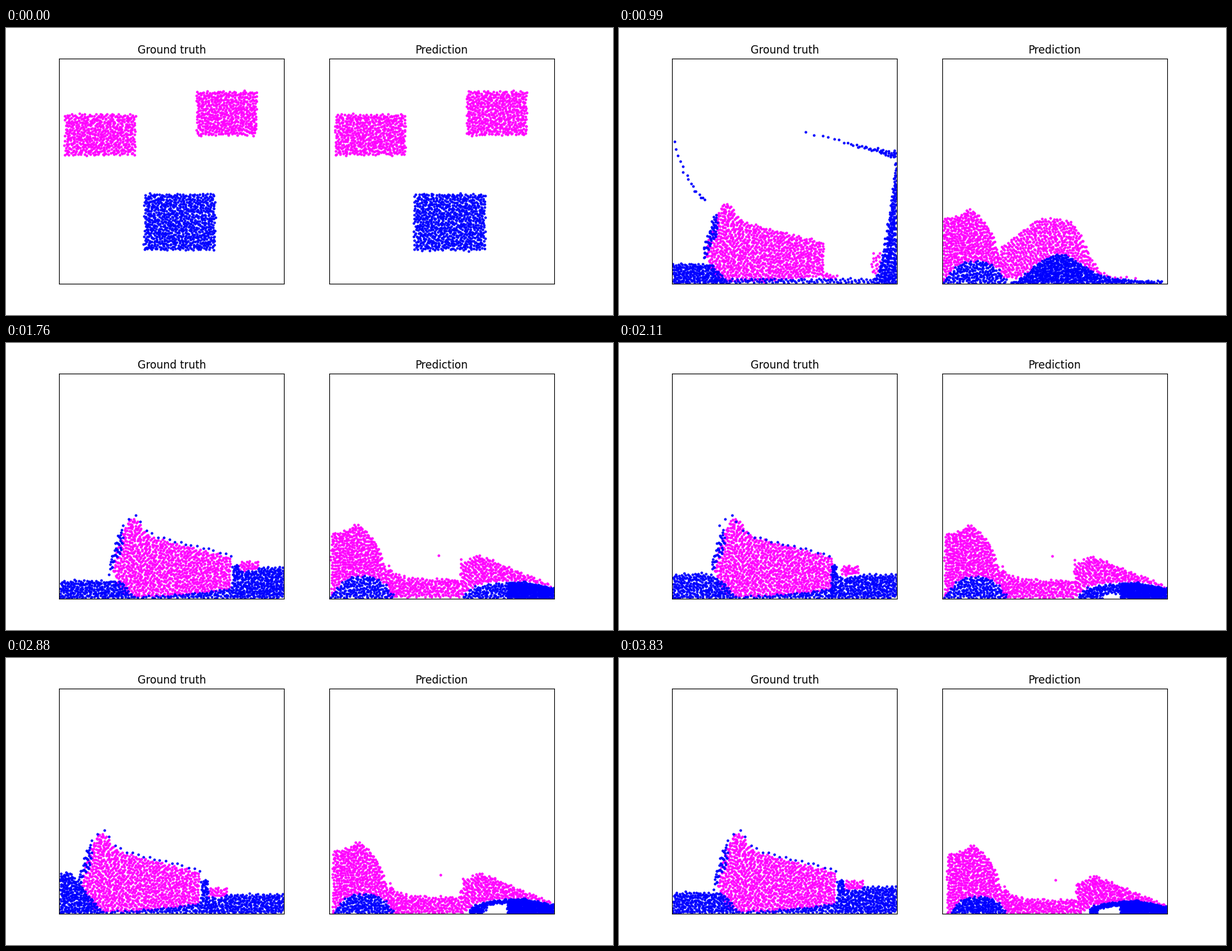
Write a matplotlib script that moves like this. It is 950x450 px and loops after 3.87 s.

```python
import numpy as np
import matplotlib.pyplot as plt
from matplotlib.animation import FuncAnimation

W, H, DPI = 950, 450, 100
FRAMES, INTERVAL = 129, 30
SIDE, TOP = 352.27, 48.36           # panel side and its distance from the top
LEFT, RIGHT = 83.0, 505.73
SINK = -0.64                        # panel bottom below the lowest dots
N_PINK, N_BLUE = 1100, 800
GOLDEN = (5 ** 0.5 - 1) / 2

rng = np.random.default_rng(4)

# Inside a panel, x runs from its left wall and heights from its floor.


def bell(x, centre, width, height, power=2):
    return height * np.exp(-np.abs((x - centre) / width) ** power)


def ramp(x, x0, x1, y0, y1):
    return y0 + (y1 - y0) * (x - x0) / (x1 - x0)


def piece(share, x0, x1, top, low=0, dx=0, dy=0):
    """A share of the dots between two profiles, each a height or a function."""
    x = np.linspace(x0, x1, 120)
    top, low = (f(x) if callable(f) else np.full_like(x, f)
                for f in (top, low))
    return share, x + dx, np.maximum(top + dy, 0), np.maximum(low + dy, 0)


def fill(n, pieces):
    """Spread n dots evenly over the pieces, in order along them."""
    cum, done = [], 0
    for share, x, top, low in pieces:
        thick = np.maximum(top - low, 0.01)
        area = np.abs(np.diff(x)) * (thick[1:] + thick[:-1])
        part = np.concatenate([[0], np.cumsum(area)])
        cum.append(done + share * part / part[-1])
        done += share
    cum = np.concatenate(cum)
    j = np.arange(n)
    at = np.interp((j + 0.5) / n * done, cum, np.arange(len(cum)))
    x, top, low = (np.interp(at, np.arange(len(cum)),
                             np.concatenate([p[i] for p in pieces]))
                   for i in (1, 2, 3))
    return np.column_stack([x, low + (j * GOLDEN % 1) * (top - low)])


# Falling blocks, common to both panels
def block(share, cx, cy, w, h):
    return piece(share, cx - w / 2, cx + w / 2, cy + h / 2, cy - h / 2)


def pink_blocks(drop=0, slide=0):
    return [block(0.515, 64, 233 - drop, 110, 64),
            block(0.485, 262 - slide, 266.5 - drop, 94, 69)]


def blue_block(drop=0):
    return [block(1, 188.5, 96 - drop, 111, 88)]


# Left panel: water splashes around an elastic body, which then sways
def body_top(x):
    slope = 100 - 0.26 * (x - 130) + bell(x, 118, 14, 23)
    return np.minimum(slope, 55 + 3.3 * (x - 85))


def body_low(x):
    return 2 + 43 * np.exp((85 - x) / 8) + 10 * ((x - 118) / 150) ** 2


def body(s):
    return piece(0.97, 85, 268, body_top, body_low, dx=s)


def valley(x):
    return 13 + 32 * ((x - 100) / 84) ** 2


def landed_top(x):
    return ramp(x, 14, 184, 115, 97) + bell(x, 24, 12, 17) + bell(x, 100, 20, 9)


def landed_water(x):
    heap = np.minimum(valley(x), 40) + bell(x, 232, 10, 8)
    return np.where(x < 238, heap, 3 + 40 * np.exp((238 - x) / 18))


def left_pool(share, s, level):
    return piece(share, 1, 118 + s,
                 lambda x: np.minimum(level, 1.2 * (119 + s - x)))


def left_column(share, s):
    return piece(share, 78, 100, lambda x: np.minimum(55 + 3 * (x - 78), 108),
                 lambda x: 35 + 2 * (x - 78), dx=s)


def arc(x):
    return 207 + 32 * (np.maximum(351 - x, 0) / 146) ** 1.3


def right_level(s):
    return 3850 / (80 - s)


def sway_pink(s):
    low = right_level(s) - 4
    return [body(s), piece(0.03, 282, 312, low + 14, low, dx=s)]


def sway_blue(s):
    level = right_level(s)

    def pool(x):
        return np.where(x < 282 + s, 53, np.where(x < 310 + s, level - 5, level))

    return [
        left_pool(0.34, s, 2400 / (87 + s)),
        left_column(0.05, s),
        piece(0.11, 117, 271, lambda x: 3 + 13 * ((x - 117) / 150) ** 2, dx=s),
        piece(0.475, 271 + s, 351, pool),
        piece(0.025, 274, 97, lambda x: body_top(x) + 5,
              lambda x: body_top(x) + 2, dx=s),
    ]


truth_pink = {
    0: pink_blocks(),
    7: pink_blocks(50, 61),
    15: [piece(0.97, 14, 184, landed_top, valley),
         piece(0.03, 186, 226, lambda x: ramp(x, 186, 226, 51, 57),
               lambda x: ramp(x, 186, 226, 42, 48))],
    33: [body(-31),
         piece(0.012, 236, 260, lambda x: ramp(x, 236, 260, 17, 11), 8),
         piece(0.018, 312, 326, 48, 14)],
}
truth_blue = {
    0: blue_block(),
    7: blue_block(51),
    15: [piece(0.18, 1, 21, lambda x: ramp(x, 1, 21, 116, 75)),
         piece(0.81, 21, 344, landed_water, lambda x: bell(x, 47, 6, 22)),
         piece(0.01, 348, 351, 50)],
    33: [piece(0.02, 1, 53, lambda x: 109 + 126 * np.exp(-x / 30),
               lambda x: 106 + 126 * np.exp(-x / 30)),
         left_pool(0.30, -31, 30),
         left_column(0.07, -29),
         piece(0.13, 82, 318, 7),
         piece(0.42, 317, 351,
               lambda x: 10 + 190 * ((x - 317) / 34) ** 1.7),
         piece(0.06, 351, 205, arc,
               lambda x: arc(x) - 1 - 12 * ((x - 205) / 146) ** 3)],
}
for key, s in ((58, 0), (84, -44), (96, -49), (108, -41), (127, -13)):
    truth_pink[key] = sway_pink(s)
    truth_blue[key] = sway_blue(s)


# Right panel: one pile parts into two heaps that slowly sink
def dome(x):
    foot = np.minimum(np.minimum(13 + 0.3 * x, 25), 2 * (198 - x))
    return foot + bell(x, 117, 42, 55)


def pile_top(x):
    arch = 70 + 96 * np.sqrt(np.clip(1 - ((x - 118) / 66) ** 2, 0, 1))
    return np.where(x < 75, 100 + 0.25 * x, arch)


def heap(x):
    return bell(x, 52, 42, 34, 4)


def left_hump(x):
    return bell(x, 0, 91, 103, 8) + bell(x, 43, 14, 14)


def right_hump(x):
    return np.minimum(54 + 0.75 * (x - 88),
                      10 + 92 / (1 + np.exp((x - 226) / 10)))


def swell(x):
    foot = 3 + 0.05 * (345 - x)
    return (bell(x, 185, 45, 34) + foot) * np.clip((x - 108) / 35, 0.15, 1)


def late_top(x):
    hill = np.minimum(55 + 0.5 * (x - 206), 67 - 0.41 * (x - 236))
    return np.where(x < 206, 30 + 22 * np.exp((91 - x) / 15), hill)


def wedge(x):
    rise = 25 * (1 - np.exp(np.minimum(207 - x, 0) / 18))
    return np.minimum(rise, 16 + 0.2 * (351 - x))


def sink_pink(k):
    move = dict(dx=1.5 * k, dy=-3 * k)
    return [piece(0.47, 3, 91, left_hump, heap, **move),
            piece(2 / N_PINK, 152, 224, lambda x: ramp(x, 152, 224, 71, 60),
                  lambda x: ramp(x, 152, 224, 70, 59), dx=2 * k, dy=-5 * k),
            piece(0.53 - 2 / N_PINK, 91, 350, late_top,
                  lambda x: wedge(x) + 2, **move)]


def sink_blue(k):
    def hollow(x):
        under = wedge(x - 4 * k) - 6
        return np.where((x > 243) & (k > 0), under, 0)

    return [piece(0.25, 1 + 3 * k, 102, heap, dx=1.5 * k, dy=-3 * k),
            piece(0.14, 207 + 8 * k, 278, lambda x: wedge(x - 4 * k), hollow,
                  dy=-2 * k),
            piece(0.61, 279, 351, wedge, dy=-2 * k)]


guess_pink = {
    0: pink_blocks(),
    7: pink_blocks(50, 61),
    15: [piece(0.02, 1, 78, lambda x: 122 + 0.45 * x, lambda x: 103 + 0.45 * x),
         piece(0.98, 1, 184, pile_top, lambda x: dome(x) + 1)],
    33: [piece(0.47, 1, 90, left_hump, heap),
         piece(0.53, 90, 310, right_hump,
               lambda x: np.maximum(swell(x), 9))],
}
guess_blue = {
    0: blue_block(),
    7: blue_block(51),
    15: [piece(1, 1, 197, dome)],
    33: [piece(0.25, 1, 102, heap), piece(0.75, 106, 345, swell)],
}
for k, key in enumerate((58, 84, 108, 127)):
    guess_pink[key] = sink_pink(k)
    guess_blue[key] = sink_blue(k)


class Track:
    """Smooth motion of a cloud of dots through its poses, no overshoot."""

    def __init__(self, poses, n):
        self.times = np.array(list(poses), float)
        jitter = np.clip(rng.normal(0, 0.8, (n, 2)), -1.6, 1.6)
        self.pts = np.array([fill(n, p) + jitter for p in poses.values()])
        slope = np.diff(self.pts, axis=0) / np.diff(self.times)[:, None, None]
        a, b = slope[:-1], slope[1:]
        same = a * b > 0
        self.tan = np.zeros_like(self.pts)
        self.tan[1:-1] = np.where(same, 2 * a * b / np.where(same, a + b, 1), 0)
        self.tan[0, :, 0] = slope[0, :, 0]
        self.tan[-1] = slope[-1]

    def at(self, t):
        k = np.searchsorted(self.times, t, side="right") - 1
        k = min(k, len(self.times) - 2)
        span = self.times[k + 1] - self.times[k]
        u = (t - self.times[k]) / span
        pos = ((1 + 2 * u) * (1 - u) ** 2 * self.pts[k]
               + u * (1 - u) ** 2 * span * self.tan[k]
               + u * u * (3 - 2 * u) * self.pts[k + 1]
               + u * u * (u - 1) * span * self.tan[k + 1])
        return np.clip(pos, (1, 0), (SIDE - 0.8, SIDE))


fig = plt.figure(figsize=(W / DPI, H / DPI), dpi=DPI, facecolor="white")


def panel(left, title):
    ax = fig.add_axes([left / W, 1 - (TOP + SIDE) / H, SIDE / W, SIDE / H])
    ax.set(xlim=(0, SIDE), ylim=(SINK, SIDE + SINK), xticks=[], yticks=[])
    ax.set_title(title)
    return ax


def dots(ax, color):
    return ax.plot([], [], "o", ms=2, color=color)[0]


clouds = []
for left, title, pink, blue in (
        (LEFT, "Ground truth", truth_pink, truth_blue),
        (RIGHT, "Prediction", guess_pink, guess_blue)):
    ax = panel(left, title)
    clouds.append((dots(ax, "magenta"), Track(pink, N_PINK)))
    clouds.append((dots(ax, "blue"), Track(blue, N_BLUE)))


def draw(i):
    for line, track in clouds:
        line.set_data(*track.at(i).T)
    return [line for line, _ in clouds]


anim = FuncAnimation(fig, draw, frames=FRAMES, interval=INTERVAL,
                     repeat=True, repeat_delay=0)
plt.show()
```
